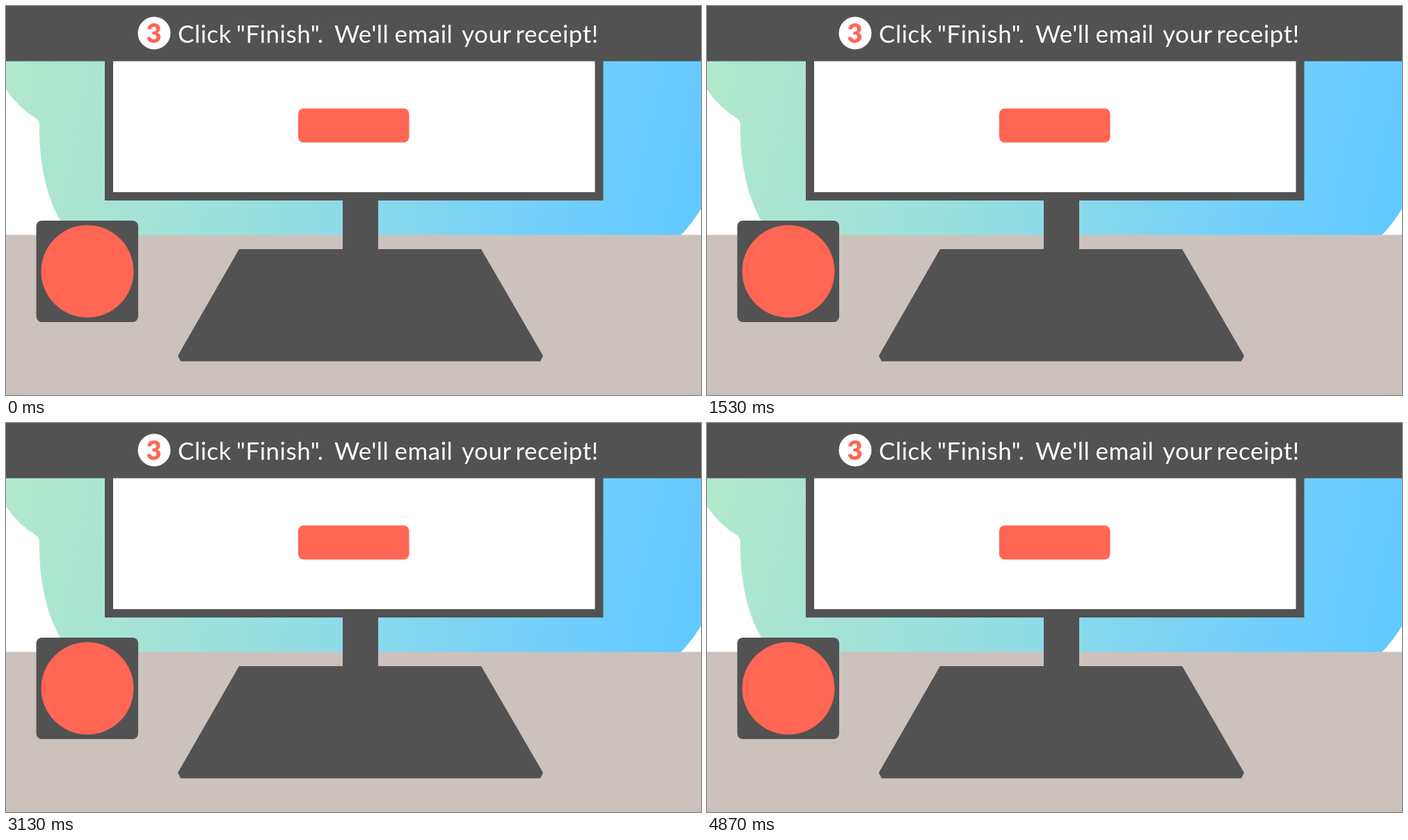
An HTML page that plays this animation: 999x560 px, repeating every 4910 ms.

```html
<!DOCTYPE html>
<html lang="en">
<head>
<meta charset="utf-8">
<title>Click Finish</title>
<style>
  html, body { margin: 0; width: 100%; height: 100%; overflow: hidden; background: #fff; }
  svg { display: block; width: 999px; height: 560px; }
  text { font-family: Lato, "Open Sans", sans-serif; }
  .dark { fill: #525252; }
  .red { fill: #ff6654; }
  .title { font-size: 35px; letter-spacing: .5px; fill: #fff; }
  .number { font-size: 38px; font-weight: 900; text-anchor: middle; }
</style>
</head>
<body>
<svg viewBox="0 0 999 560">
  <defs>
    <linearGradient id="sky" gradientUnits="userSpaceOnUse" x1="0" y1="80" x2="980" y2="290">
      <stop offset="0" stop-color="#b2e8cc"/>
      <stop offset=".25" stop-color="#a3e3d6"/>
      <stop offset=".5" stop-color="#8fdce6"/>
      <stop offset=".78" stop-color="#75d0fb"/>
      <stop offset="1" stop-color="#62c9ff"/>
    </linearGradient>
  </defs>

  <path fill="url(#sky)" d="M0 70H999V292Q987 312 970 330H90Q82 320 78 309C57 273 47 222 48 170Q48 166 45 163Q17 146 0 120Z"/>
  <rect y="329.5" width="999" height="231" fill="#cbc2be"/>

  <rect class="dark" x="142" y="70" width="716.5" height="210"/>
  <rect x="154" y="70" width="692.5" height="198" fill="#fff"/>
  <rect class="dark" x="484" y="279" width="51" height="73"/>
  <path class="dark" d="M335 350H683L772 503.5L768 511.5H251L247 503.5Z"/>

  <rect class="dark" x="43.5" y="309" width="146.5" height="146" rx="8"/>
  <circle class="red" cx="117" cy="382" r="66.5"/>

  <rect class="red" x="420" y="147.5" width="159.5" height="49" rx="8"/>
  <circle id="ring" cx="498.5" cy="170.3" fill="none" stroke="#1494fa" stroke-opacity=".34"/>

  <rect class="dark" width="999" height="79.5"/>
  <circle cx="213" cy="39" r="23.5" fill="#fff"/>
  <text class="number red" x="212.5" y="52.5">3</text>
  <text class="title" y="52.5"><tspan x="247">Click </tspan><tspan x="331">"Finish". </tspan><tspan x="472">We'll </tspan><tspan x="558.5">email </tspan><tspan x="655">your </tspan><tspan x="732.5">receipt!</tspan></text>
</svg>
<script>
  const LOOP = 4910, STEP = 100 / 3, STEPS_PER_CLICK = 49;
  const START = 612, GROW = 308, FADE = 333;
  const RADIUS = 61.2, BAND = 0.37;
  const ring = document.getElementById('ring');
  const begin = performance.now();

  function draw(time) {
    const step = Math.min(146, Math.floor((time + 5) / STEP));
    const age = (step % STEPS_PER_CLICK) * STEP - START;
    const visible = age > 0 && age < FADE;
    ring.setAttribute('visibility', visible ? 'visible' : 'hidden');
    if (!visible) return;
    // The outer edge eases out while the band thins late.
    const outer = RADIUS * (1 - (1 - Math.min(1, age / GROW)) ** 3);
    const band = outer * BAND * (1 - (age / FADE) ** 3);
    ring.setAttribute('r', outer - band / 2);
    ring.setAttribute('stroke-width', band);
  }

  function tick() {
    draw((performance.now() - begin) % LOOP);
    requestAnimationFrame(tick);
  }
  tick();
</script>
</body>
</html>
```
